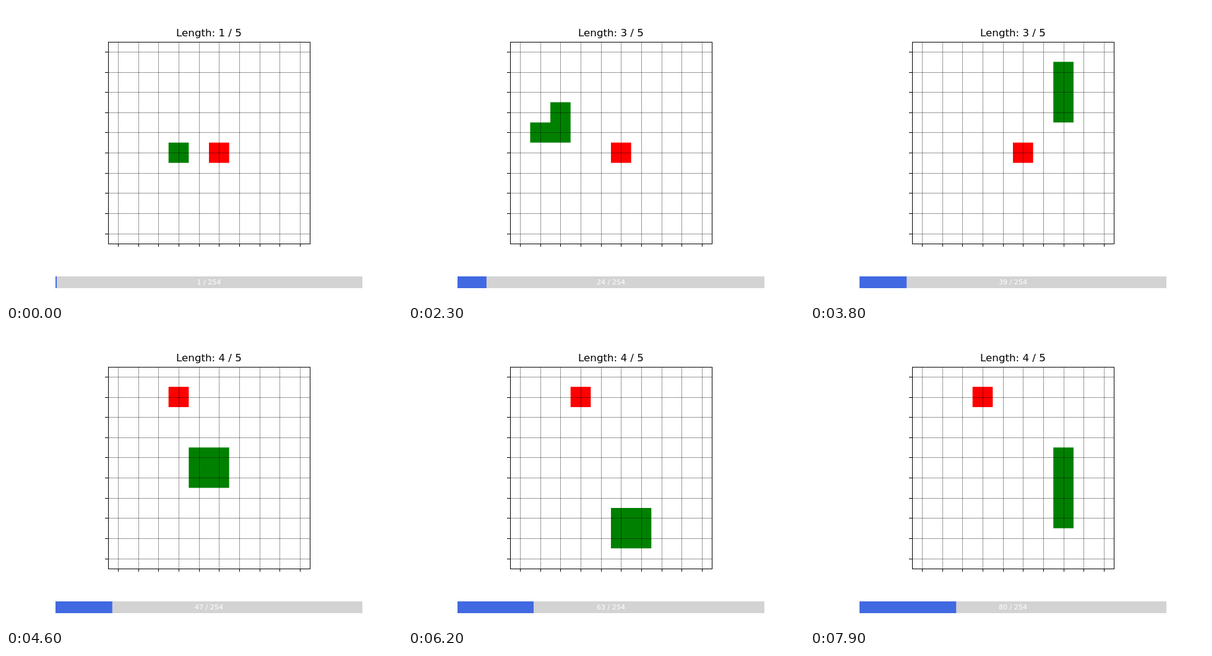
Recreate the animation shown at these times as an HTML page with a canvas. Size 640 px wide and 480 px high, loop 8000 ms.

```html
<!DOCTYPE html>
<html lang="en">
<head>
<meta charset="utf-8">
<title>Snake</title>
<style>
  html, body { margin: 0; width: 100%; height: 100%; overflow: hidden; background: #fff; }
  canvas { display: block; }
</style>
</head>
<body>
<canvas id="stage" width="640" height="480"></canvas>
<script>
const ctx = document.getElementById('stage').getContext('2d');
const STEP = 100, STEPS = 80, TOTAL = 254, EAT_STEP = 44;
const CELLS = 10, SIZE = 32.64, LEFT = 164.8, TOP = 57.6;
const MOVES = 'LULUURURDDL' + 'LUURRRDDLLDL' + 'UUUURRDRURRRDDD' +
  'DLULDDLU' + 'UUUURDDRDDDDDDLU' + 'LLDRRRRRRDLLUUUUU';
const DIRS = { L: [-1, 0], R: [1, 0], U: [0, -1], D: [0, 1] };

// Head position at every step
const path = [[3, 5]];
for (const m of MOVES) {
  const [x, y] = path[path.length - 1];
  path.push([x + DIRS[m][0], y + DIRS[m][1]]);
}

const lineX = i => Math.round(181.2 + 32.62 * i);
const lineY = i => Math.round(73.91 + 32.622 * i);

function rect(color, x, y, w, h) {
  ctx.fillStyle = color;
  ctx.fillRect(x, y, w, h);
}

// One path, so that neighbouring cells join without seams
function fillCells(color, cells) {
  ctx.beginPath();
  for (const [x, y] of cells) ctx.rect(LEFT + SIZE * x, TOP + SIZE * y, SIZE, SIZE);
  ctx.fillStyle = color;
  ctx.fill();
}

function label(text, y, size, color) {
  ctx.font = `${size}px "DejaVu Sans", sans-serif`;
  ctx.textAlign = 'center';
  ctx.fillStyle = color;
  ctx.fillText(text, 328, y);
}

function draw(step) {
  const eaten = step >= EAT_STEP;
  const length = eaten ? 4 : Math.min(step + 1, 3);
  rect('#fff', 0, 0, 640, 480);

  fillCells('#008000', path.slice(step + 1 - length, step + 1));
  fillCells('#f00', [eaten ? [3, 1] : [5, 5]]);

  for (let i = 0; i < CELLS; i++) {
    const x = lineX(i), y = lineY(i);
    rect('rgba(0,0,0,.4)', x, 58, 1, 326);
    rect('rgba(0,0,0,.4)', 165, y, 326, 1);
    rect('#000', x, 385, 1, 4);
    rect('#000', 160, y, 5, 1);
  }
  ctx.strokeStyle = '#000';
  ctx.lineWidth = 1;
  ctx.strokeRect(165.5, 58.5, 326, 326);
  label(`Length: ${length} / 5`, 49, 16.67, '#000');

  const count = step + 1;
  rect('#d3d3d3', 80, 437, 496, 19);
  rect('#4169e1', 80, 437, 496 * count / TOTAL, 19);
  label(`${count} / ${TOTAL}`, 450, 11.11, '#fff');
}

const start = performance.now();
function tick() {
  draw(Math.floor((performance.now() - start) / STEP) % STEPS);
  requestAnimationFrame(tick);
}
tick();
</script>
</body>
</html>
```
